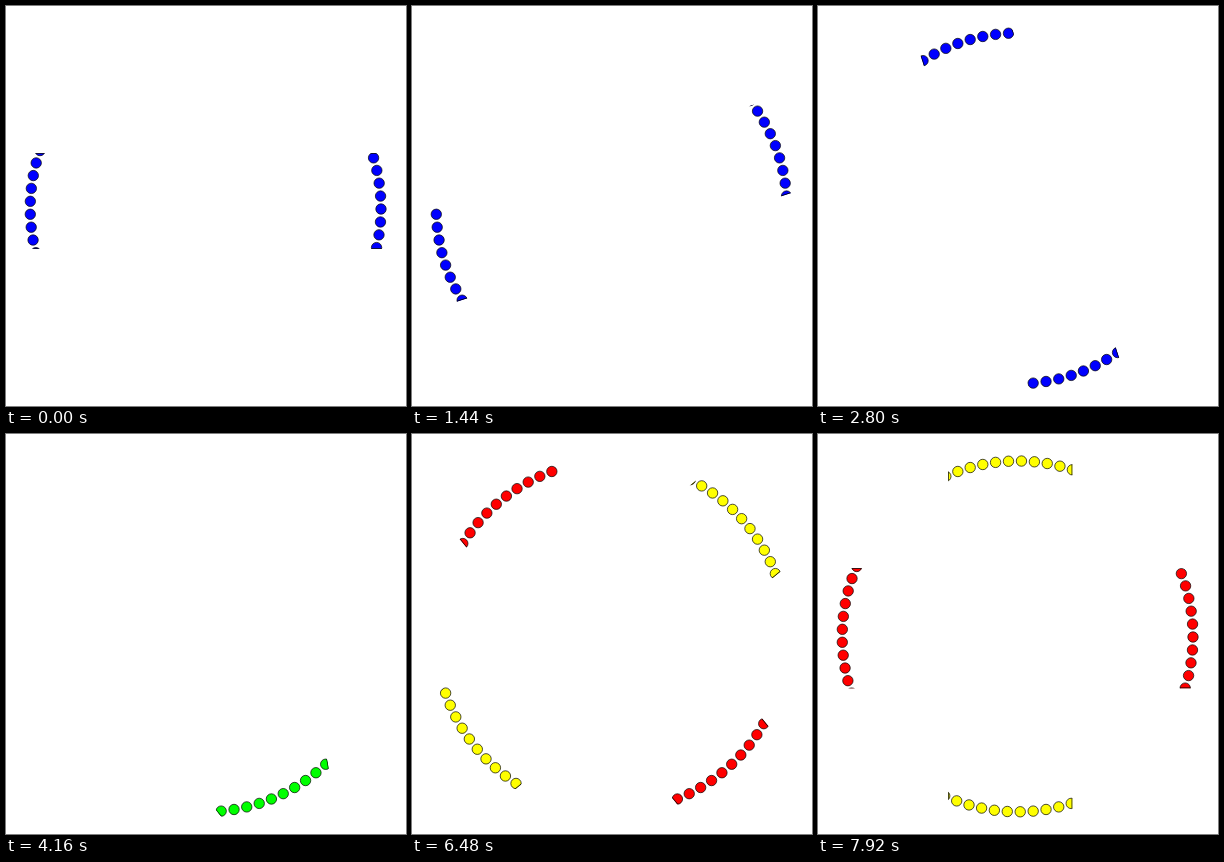
An HTML page with a canvas for the animation above (8 s loop, 400x400 px).

```html
<!DOCTYPE html>
<html lang="en">
<head>
<meta charset="utf-8">
<title>Ring of lights</title>
<style>
html, body { margin: 0; width: 100%; height: 100%; overflow: hidden; background: #fff; }
canvas { display: block; width: 400px; height: 400px; }
</style>
</head>
<body>
<canvas id="stage" width="400" height="400"></canvas>
<script>
const ctx = document.getElementById('stage').getContext('2d');
const STEP = 80, STEPS = 100;
const DOTS = 85, DOT_RADIUS = 5.2, RADIUS = 175.4, CENTER = [199.6, 202.4], TURN = 0.2;
const BLUE = '#00f', GREEN = '#0f0', RED = '#f00', YELLOW = '#ff0';
const rad = deg => deg * Math.PI / 180;

// Angles in degrees, clockwise, as [step, angle]
const blueSpin = [[0, 0], [18, -198], [35, -468], [44, -567]];
const greenOrbit = [[44, 154], [52, 67.3], [55, 33], [65, -85]];
const crossSpin = [[75, 67.5], [99, 0]];

function angleAt(keys, step) {
  if (step <= keys[0][0]) return keys[0][1];
  for (let i = 1; i < keys.length; i++) {
    const [s0, a0] = keys[i - 1], [s1, a1] = keys[i];
    if (step <= s1) return a0 + (a1 - a0) * (step - s0) / (s1 - s0);
  }
  return keys[keys.length - 1][1];
}

const ring = new Path2D();
for (let i = 0; i < DOTS; i++) {
  const a = rad(i * 360 / DOTS + TURN);
  const x = CENTER[0] + RADIUS * Math.cos(a), y = CENTER[1] + RADIUS * Math.sin(a);
  ring.moveTo(x + DOT_RADIUS, y);
  ring.arc(x, y, DOT_RADIUS, 0, 2 * Math.PI);
}

function bar(x, y, angle, half) {
  const box = new Path2D(), placed = new Path2D();
  box.rect(-300, -half, 600, 2 * half);
  placed.addPath(box, new DOMMatrix().translate(x, y).rotate(angle));
  return placed;
}

function disc(x, y, angle, distance, radius) {
  const path = new Path2D();
  path.arc(x + distance * Math.cos(rad(angle)), y + distance * Math.sin(rad(angle)), radius, 0, 2 * Math.PI);
  return path;
}

function drawRing(color) {
  ctx.fillStyle = color;
  ctx.strokeStyle = '#000';
  ctx.lineWidth = 0.7;
  ctx.fill(ring);
  ctx.stroke(ring);
}

// Cut dots are outlined along the cut as well
function ringInside(color, mask) {
  ctx.save();
  ctx.clip(mask);
  drawRing(color);
  ctx.clip(ring);
  ctx.lineWidth = 1.4;
  ctx.stroke(mask);
  ctx.restore();
}

function draw(step) {
  ctx.fillStyle = '#fff';
  ctx.fillRect(0, 0, 400, 400);
  if (step < 44) {
    ringInside(BLUE, bar(200, 195, angleAt(blueSpin, step), 47.7));
  } else if (step < 68) {
    ringInside(GREEN, disc(200, 195, angleAt(greenOrbit, step), 157.7, 62));
  } else if (step < 75) {
    if (step !== 69) drawRing(GREEN);
  } else {
    const angle = angleAt(crossSpin, step);
    ringInside(YELLOW, bar(192.3, 202, angle + 90, 62));
    ringInside(RED, bar(198.5, 194.3, angle, 60));
  }
}

const began = performance.now();
function tick() {
  draw(Math.floor((performance.now() - began) / STEP) % STEPS);
  requestAnimationFrame(tick);
}
tick();
</script>
</body>
</html>
```
